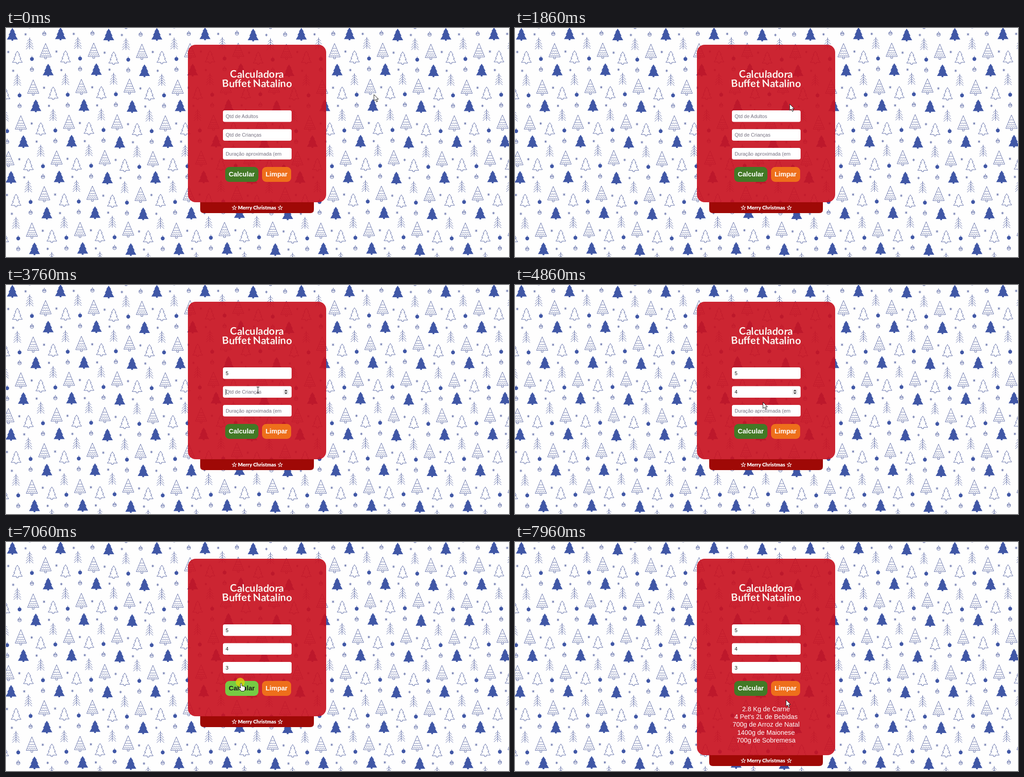
Animation, 1106 px wide and 506 px high, one loop 8 s. Source, as an HTML page:

```html
<!DOCTYPE html>
<html lang="pt">
<head>
<meta charset="utf-8">
<title>Calculadora Buffet Natalino</title>
<style>
  html, body { margin: 0; width: 100%; height: 100%; overflow: hidden; background: #fefefe; }
  svg { display: block; width: 1106px; height: 506px; }
  text { font-family: "Liberation Sans", Arial, sans-serif; }
  .line { fill: none; stroke: #5a68a4; stroke-width: .95; }
  .solid { fill: #4057a6; }
  .mid { text-anchor: middle; }
  .title, .wish { font-family: Lato, sans-serif; font-weight: 700; fill: #fbf3ee; }
  .title { font-size: 22.5px; }
  .wish { font-size: 11.2px; font-weight: 900; fill: #fff; }
  .star { font: 14px "DejaVu Sans", sans-serif; fill: #fff; stroke: #fff; stroke-width: .4; }
  .field text { font-size: 10.9px; }
  .btn { font-size: 14.5px; font-weight: 700; fill: #fff; }
  .result text { font-size: 14.4px; fill: #fff; }
  .pointer { fill: #fff; stroke: #111; stroke-width: 1; stroke-linejoin: round; }
</style>
</head>
<body>
<svg viewBox="0 0 1106 506">
  <defs>
    <g id="motif">
      <path class="solid" d="M0-14 5.500-6H4L8.500 2H6.500L12 11.500H2V14h-4v-2.500h-10L-6.500 2H-8.500L-4-6h-1.500Z"/>
      <path class="line" d="M29-3v6M26.500-1.500l5 3M31.500-1.500l-5 3"/>
      <path class="line" d="M-9 36v6M-11.500 37.500l5 3M-6.500 37.500l-5 3"/>
      <g class="line" transform="translate(38 20)">
        <path d="M0-13V13M-5-5 0-10 5-5M-7 2 0-5 7 2M-8 8 0 0 8 8M-8 13 0 5 8 13"/>
      </g>
      <g class="line" transform="translate(73 36)">
        <path d="M0-16-12.500 14h25ZM-2 14v4h4v-4"/>
        <path d="M-4-6l2 2 2-2 2 2 2-2M-6.500 0l2.200 2 2.100-2L0 2l2.200-2 2.100 2L6.500 0M-8 5l2 2 2-2 2 2 2-2 2 2 2-2 2 2 2-2M-10 9.500l2.500 2 2.500-2 2.500 2 2.500-2 2.500 2 2.500-2 2.500 2 2.500-2"/>
      </g>
      <path class="line" transform="translate(11 51)" d="M0-14 5-6H3L8 3H5.500L11 11H2v3h-4v-3h-9L-5.500 3H-8l5-9h-2Z"/>
      <g transform="translate(43 54.500)">
        <circle class="solid" r="4.200"/><path class="line" d="M0-4v-3"/>
      </g>
      <g class="line" transform="translate(43 78)">
        <circle r="3.900"/><path d="M0-4v-3M-3.500-1.500h7M-3.500 1l1.700-1.500L0 1l1.800-1.500L3.500 1"/>
      </g>
    </g>
    <g id="spin">
      <rect x="609.500" y="-6.500" width="12" height="13" rx="2" fill="#efefef"/>
      <path d="M612-1.200 615.500-5 619-1.200ZM612 1.200 615.500 5 619 1.200Z" fill="#444"/>
    </g>
  </defs>

  <g id="paper"></g>
  <rect id="card" x="400" y="37" width="304" height="348" rx="17" fill="#c81321" fill-opacity=".92"/>
  <g id="ribbon">
    <path d="M427 385h250v16q0 8-8 8H435q-8 0-8-8Z" fill="#9f0906"/>
    <text class="mid star" x="502" y="402">☆</text>
    <text class="mid wish" x="552" y="401">Merry Christmas</text>
    <text class="mid star" x="603" y="402">☆</text>
  </g>
  <text class="mid title" x="552" y="110" rotate="-4 3 -3 4 -2 3 -4 2 -3 4 -2">Calculadora</text>
  <text class="mid title" x="552" y="130.500" rotate="-4 3 -3 4 -2 3 0 -4 2 -3 4 -2 3 -3 2">Buffet Natalino</text>
  <g id="form"></g>
  <rect id="calc" x="482" y="307" width="73" height="33" rx="9"/>
  <text id="calcText" class="mid btn" x="518.300" y="328">Calcular</text>
  <rect x="563" y="307" width="64" height="33" rx="9" fill="#ee6f1b"/>
  <text class="mid btn" x="594.800" y="328">Limpar</text>
  <g id="result" class="result"></g>

  <g id="mouse">
    <circle id="click" r="10" fill="#dcd30c" fill-opacity=".78"/>
    <path id="arrow" class="pointer" d="M0 0V14L3.300 11 5.700 16.300 8 15.300 5.700 10.200H10Z"/>
    <path id="beam" d="M-3-6.500h6M0-6.500v13M-3 6.500h6" fill="none" stroke="#111"/>
    <path id="hand" class="pointer" transform="translate(2 2)" d="M0 0q1.500 0 1.500 1.500V6l5 1q2 .5 2 2.500v4l-2 4H0L-5 10.500q0-2 2-1.200l1.500 1.700V1.500Q-1.500 0 0 0Z"/>
  </g>
</svg>
<script>
const $ = id => document.getElementById(id);
const show = (el, on) => el.setAttribute("visibility", on ? "visible" : "hidden");
const LOOP = 8000, OPEN = 7130;

// Wallpaper: one motif on a slanted lattice
const STEP = 105.9, WOBBLE = [0, -1, 1.5];
let paper = "";
for (let row = -2; row < 7; row++) {
  const left = (((14 - 27.2 * row) % STEP) + STEP) % STEP;
  for (let i = -2; i < 12; i++) {
    const y = 14 + 79 * row + WOBBLE[(i + 3) % 3];
    paper += `<use href="#motif" x="${left + i * STEP}" y="${y}"/>`;
  }
}
$("paper").innerHTML = paper;

const fields = [
  { hint: "Qtd de Adultos", value: 5, y: 182, focus: 2350, typed: 2880, blur: 3630 },
  { hint: "Qtd de Crianças", value: 4, y: 223.5, focus: 3630, typed: 3960, blur: 5530 },
  { hint: "Duração aproximada (em", value: 3, y: 265, focus: 5530, typed: 6070, blur: 7060 }
];
for (const f of fields) {
  $("form").insertAdjacentHTML("beforeend", `<g class="field" transform="translate(0 ${f.y})">
    <rect x="477" width="151" height="25.500" rx="4" fill="#fff"/>
    <text x="483" y="16.500"></text>
    <use href="#spin" y="12.800"/>
    <path d="M0 6.500v13" stroke="#111"/></g>`);
  [, f.text, f.spin, f.caret] = $("form").lastElementChild.children;
}

$("result").innerHTML = ["2.8 Kg de Carne", "4 Pet's 2L de Bebidas", "700g de Arroz de Natal",
  "1400g de Maionese", "700g de Sobremesa"]
  .map((s, i) => `<text class="mid" x="552" y="${374 + 17.2 * i}">${s}</text>`).join("");

// Pointer moves: start, end, steps, then the points passed
const moves = [
  [270, 1020, 11, [809, 147], [836, 128], [764, 92]],
  [1090, 1860, 12, [764, 92], [690, 118], [604, 168]],
  [1930, 2150, 4, [604, 168], [577, 190]],
  [2950, 3430, 7, [577, 190], [554, 232]],
  [4030, 4500, 6, [554, 232], [550, 294], [546, 254]],
  [4700, 5470, 11, [546, 254], [543, 272]],
  [6140, 6840, 11, [543, 272], [515, 310]],
  [7330, 7960, 10, [515, 310], [541, 348], [596, 349]]
];
const clicks = [[2350, 2420], [3630, 3760], [5530, 5600], [7060, 7130]];

function pointer(t) {
  const move = moves.filter(m => m[0] <= t).pop();
  if (!move) return moves[0][3];
  const [start, end, steps, ...pts] = move;
  const done = Math.floor((t - start) / (end - start) * (steps - 1) + 1e-6) + 1;
  const at = Math.min(done / steps, 1) * (pts.length - 1);
  const i = Math.min(Math.floor(at), pts.length - 2), k = at - i;
  return pts[i].map((v, axis) => v + (pts[i + 1][axis] - v) * k);
}

function draw(t) {
  const [x, y] = pointer(t);
  const over = (l, top, r, b) => x >= l && x <= r && y >= top && y <= b;
  let inField = false;

  for (const f of fields) {
    const typed = t >= f.typed, focused = t >= f.focus && t < f.blur;
    const hover = over(477, f.y, 628, f.y + 25.5);
    const since = t - (typed ? f.typed : f.focus);
    inField = inField || hover;
    f.text.textContent = typed ? f.value : f.hint;
    f.text.setAttribute("fill", typed ? "#111" : "#757080");
    f.caret.setAttribute("transform", `translate(${typed ? 489.5 : 483.5} 0)`);
    show(f.caret, focused && since % 1000 < 500);
    show(f.spin, focused || hover);
  }

  const onButton = over(481, 307, 555, 340);
  $("calc").setAttribute("fill", onButton ? "#76cb43" : "#437926");
  $("calcText").style.fill = onButton ? "#1c1c1c" : "#fff";

  const open = t >= OPEN;
  $("card").setAttribute("height", open ? 434 : 348);
  $("ribbon").setAttribute("transform", `translate(0 ${open ? 86 : 0})`);
  show($("result"), open);

  $("mouse").setAttribute("transform", `translate(${x} ${y})`);
  show($("click"), clicks.some(([a, b]) => t >= a && t < b));
  show($("hand"), onButton);
  show($("beam"), inField);
  show($("arrow"), !onButton && !inField);
}

const origin = performance.now();
function tick() {
  draw((performance.now() - origin) % LOOP);
  requestAnimationFrame(tick);
}
tick();
</script>
</body>
</html>
```
